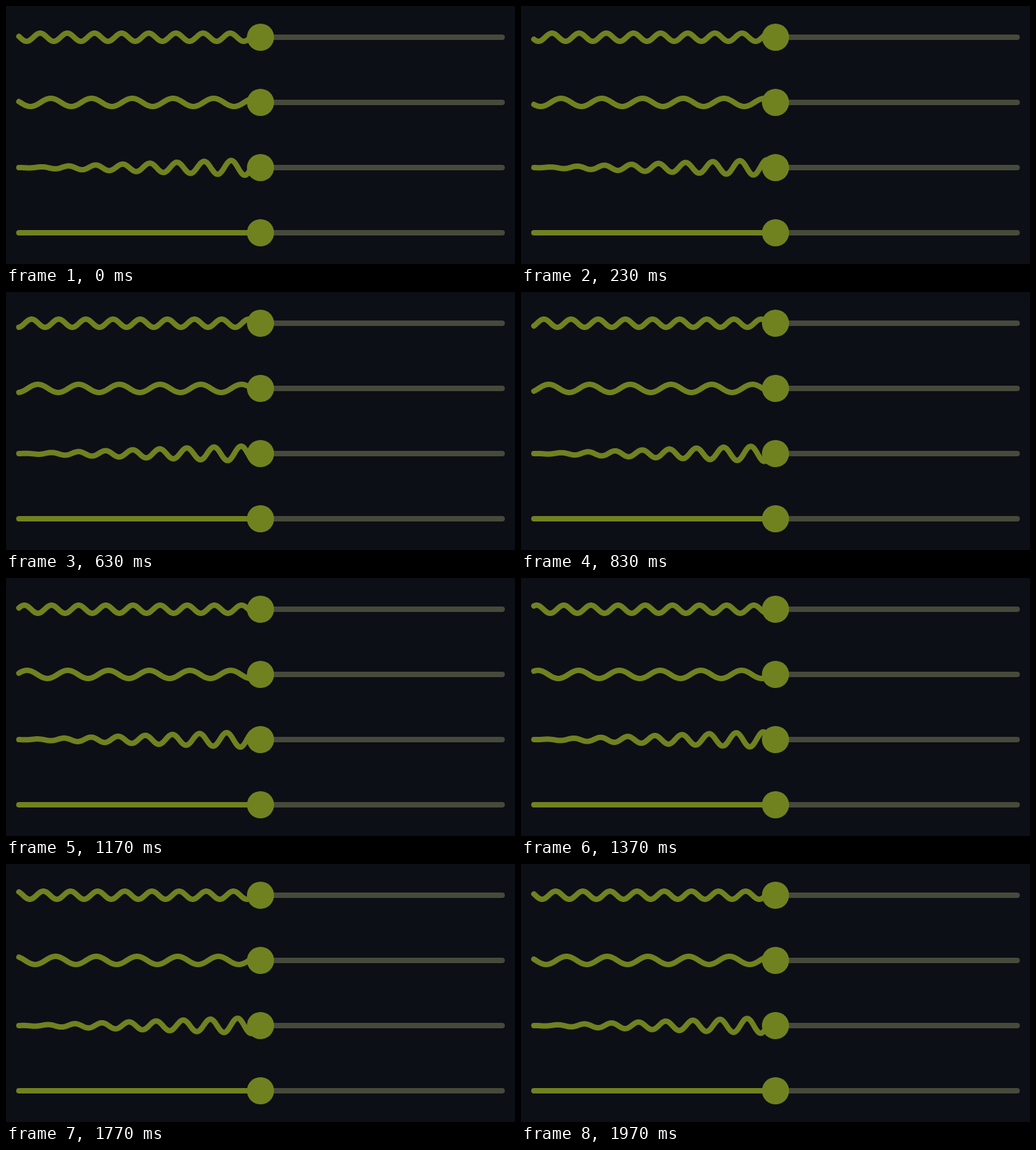
Write an HTML page that moves like this. It is 750 by 380 pixels and loops after 2.01 s.

```html
<!DOCTYPE html>
<html lang="en">
<head>
<meta charset="utf-8">
<title>Wavy sliders</title>
<style>
  html, body { margin: 0; width: 100%; height: 100%; overflow: hidden; background: #0c0f16; }
  svg { display: block; width: 750px; height: 380px; }
  path { fill: none; stroke-width: 8; stroke-linecap: round; stroke-linejoin: round; }
  .rest { stroke: #464a3a; }
  .done { stroke: #708220; }
  circle { fill: #708220; }
</style>
</head>
<body>
<svg id="stage" viewBox="0 0 750 380"></svg>
<script>
const LOOP = 2010, STEPS = 60;
const START = 19, THUMB = 375, END = 731;

// crest: first crest as a share of the wavelength; turns: wavelengths per loop
const rows = [
  { y: 46, amp: 6, length: 40, crest: 0.783, turns: 1 },
  { y: 142, amp: 6, length: 60, crest: 0.783, turns: 1 },
  { y: 238, amp: 12, length: 40, crest: 0.8175, turns: 2, grow: true },
  { y: 334, amp: 0, length: 40, crest: 0, turns: 0 }
];

const stage = document.getElementById('stage');

function add(tag, attrs) {
  const node = document.createElementNS('http://www.w3.org/2000/svg', tag);
  for (const key in attrs) node.setAttribute(key, attrs[key]);
  return stage.appendChild(node);
}

function wave(row, progress) {
  const points = [];
  for (let x = START; x <= THUMB; x++) {
    const amp = row.grow ? row.amp * (x - START) / (THUMB - START) : row.amp;
    const turn = (x - START) / row.length - row.crest + progress * row.turns;
    const y = row.y - amp * Math.cos(2 * Math.PI * turn);
    points.push(x + ' ' + y.toFixed(2));
  }
  return 'M' + points.join('L');
}

for (const row of rows) {
  add('path', { class: 'rest', d: `M${THUMB} ${row.y}H${END}` });
  row.path = add('path', { class: 'done' });
  add('circle', { cx: THUMB, cy: row.y, r: 20 });
}

// 30 steps a second, each starting on the nearest 10 ms
function stepAt(ms) {
  return Math.min(STEPS - 1, Math.floor((Math.floor(ms / 10) + 0.5) * 0.3));
}

let shown = -1;
function draw(ms) {
  const step = stepAt(ms % LOOP);
  if (step === shown) return;
  shown = step;
  for (const row of rows) row.path.setAttribute('d', wave(row, step / STEPS));
}

const origin = performance.now();
function tick() {
  draw(performance.now() - origin);
  requestAnimationFrame(tick);
}
tick();
</script>
</body>
</html>
```
